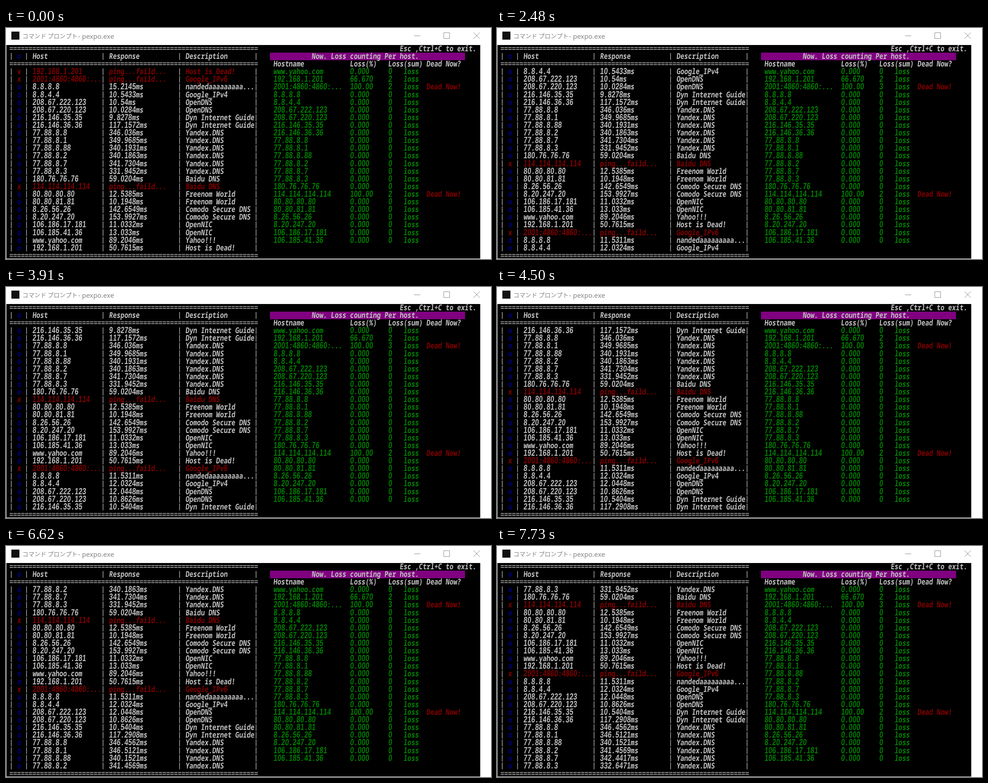
These frames come from a looping animation (1084x516 px, 8 s). An HTML page with a canvas:

```html
<!DOCTYPE html>
<html lang="ja">
<head>
<meta charset="utf-8">
<title>pexpo</title>
<style>
html, body { margin: 0; width: 100%; height: 100%; overflow: hidden; background: #fff; }
canvas { display: block; }
</style>
</head>
<body>
<canvas id="stage" width="1084" height="516"></canvas>
<script>
const ctx = document.getElementById('stage').getContext('2d');
const LOOP = 8000;
const CELL_W = 8.55, CELL_H = 17.11, LEFT = -0.9, TOP = 38;
const SILVER = '#c0c0c0', BLUE = '#000080', RED = '#800000', GREEN = '#008000', PURPLE = '#800080';
const LETTERS = { font: '800 14.2px "Noto Sans Mono", "DejaVu Sans Mono", monospace', tall: 1.25 };
const DIGITS = { font: 'bold 14.8px "Liberation Sans", Arial, sans-serif', tall: 1.35 };

// Each time the list moves up by one row.
const STEPS = [1310, 1870, 2480, 2920, 3350, 3910, 4500, 4950, 5510, 6070, 6620, 7180, 7730];

const HOSTS = `192.168.1.201|Host is Dead!
2001:4860:4860:...|Google_IPv6
8.8.8.8|nandedaaaaaaaaa...
8.8.4.4|Google_IPv4
208.67.222.123|OpenDNS
208.67.220.123|OpenDNS
216.146.35.35|Dyn Internet Guide
216.146.36.36|Dyn Internet Guide
77.88.8.8|Yandex.DNS
77.88.8.1|Yandex.DNS
77.88.8.88|Yandex.DNS
77.88.8.2|Yandex.DNS
77.88.8.7|Yandex.DNS
77.88.8.3|Yandex.DNS
180.76.76.76|Baidu DNS
114.114.114.114|Baidu DNS
80.80.80.80|Freenom World
80.80.81.81|Freenom World
8.26.56.26|Comodo Secure DNS
8.20.247.20|Comodo Secure DNS
106.186.17.181|OpenNIC
106.185.41.36|OpenNIC
www.yahoo.com|Yahoo!!!`.split('\n').map(line => line.split('|'));

// Response times in ping order; "x" is a failed ping.
const PINGS = `x x 15.2145 10.5433 10.54 10.0284 9.8278 117.1572 346.036 349.9685 340.1931
340.1863 341.7304 331.9452 59.0204 x 12.5385 10.1948 142.6549 153.9927 11.0332 13.033 89.2046
50.7615 x 11.5311 12.0324 12.0448 10.8626 10.5404 117.2908 346.4562 346.5121 340.1521
341.4569 342.4417 332.6471`.split(/\s+/);
const ROWS = 24;

const cellX = col => LEFT + col * CELL_W;
const cellY = row => TOP + row * CELL_H;

function put(text, col, row, color) {
  ctx.fillStyle = color;
  ctx.textAlign = 'center';
  [...text].forEach((ch, i) => {
    if (ch === ' ') return;
    const face = /\d/.test(ch) ? DIGITS : LETTERS;
    ctx.font = face.font;
    // Tall, slightly slanted console face.
    ctx.setTransform(1, 0, -0.12, face.tall, cellX(col + i + 0.5), cellY(row) + 13.9);
    ctx.fillText(ch, 0, 0);
  });
  ctx.resetTransform();
}

function rule(row) {
  ctx.fillStyle = SILVER;
  const y = Math.round(cellY(row) + CELL_H / 2);
  for (let col = 1; col <= 65; col++) {
    ctx.fillRect(cellX(col) + 0.6, y - 4, 7.4, 1.5);
    ctx.fillRect(cellX(col) + 0.6, y, 7.4, 1.5);
  }
}

function bars(row) {
  ctx.fillStyle = SILVER;
  for (const col of [1, 5, 25, 45, 65]) {
    ctx.fillRect(cellX(col) + 3.4, cellY(row) + 0.8, 1.3, 15.2);
  }
}

function mark(failed, row) {
  put(failed ? 'x' : 'o', 3, row, failed ? RED : BLUE);
}

function drawTitle() {
  ctx.fillStyle = '#fff';
  ctx.fillRect(0, 0, 1084, 516);
  ctx.fillStyle = '#111';
  ctx.fillRect(12, 8, 18, 18);

  ctx.fillStyle = '#858585';
  ctx.textAlign = 'left';
  ctx.font = '13.4px "Noto Sans CJK JP", "Noto Sans CJK", sans-serif';
  ctx.fillText('コマンド プロンプト', 36.5, 23);
  ctx.font = '15px "Noto Sans", sans-serif';
  ctx.fillText('- pexpo.exe', 161, 23.5);

  ctx.strokeStyle = '#8c8c8c';
  ctx.lineWidth = 1;
  ctx.beginPath();
  ctx.moveTo(912, 17.5);
  ctx.lineTo(926, 17.5);
  ctx.rect(978.5, 10.5, 13, 13);
  ctx.moveTo(1045, 10);
  ctx.lineTo(1059, 24);
  ctx.moveTo(1059, 10);
  ctx.lineTo(1045, 24);
  ctx.stroke();
}

function drawPings(step) {
  rule(0);
  bars(1);
  mark(PINGS[step + ROWS - 1] === 'x', 1);
  put('Host', 7, 1, SILVER);
  put('Response', 27, 1, SILVER);
  put('Description', 47, 1, SILVER);
  rule(2);
  for (let i = 0; i < ROWS; i++) {
    const n = step + i, row = i + 3;
    const [host, note] = HOSTS[n % HOSTS.length];
    const failed = PINGS[n] === 'x';
    const color = failed ? RED : SILVER;
    bars(row);
    mark(failed, row);
    put(host, 7, row, color);
    put(failed ? 'ping...faild...' : PINGS[n] + 'ms', 27, row, color);
    put(note, 47, row, color);
  }
  rule(27);
}

function drawLosses(step) {
  put('Esc ,Ctrl+C to exit.', 103, 0, SILVER);
  ctx.fillStyle = PURPLE;
  ctx.fillRect(590, 55, 436, 17);
  put('Now. Loss counting Per host.', 80, 1, SILVER);
  put('Hostname', 70, 2, SILVER);
  put('Loss(%)', 90, 2, SILVER);
  put('Loss(sum)', 100, 2, SILVER);
  put('Dead Now?', 110, 2, SILVER);

  const losses = { 1: ['66.670', 2], 2: ['100.00', step ? 3 : 2], 16: ['100.00', 2] };
  for (let i = 0; i < HOSTS.length; i++) {
    const row = i + 3;
    const [percent, sum] = losses[i] || ['0.000', 0];
    put(HOSTS[(i + HOSTS.length - 1) % HOSTS.length][0], 70, row, GREEN);
    put(percent, 90, row, GREEN);
    put(String(sum), 100, row, GREEN);
    put('loss', 104, row, GREEN);
    if (percent === '100.00') put('Dead Now!', 110, row, RED);
  }
}

function draw(step) {
  drawTitle();
  ctx.fillStyle = '#000';
  ctx.fillRect(1, 38, 1059, 477);
  drawPings(step);
  drawLosses(step);
}

let shown = -1;
const start = performance.now();
function tick() {
  const t = (performance.now() - start) % LOOP;
  const step = STEPS.filter(at => at <= t).length;
  if (step !== shown) draw(shown = step);
  requestAnimationFrame(tick);
}
tick();
</script>
</body>
</html>
```
